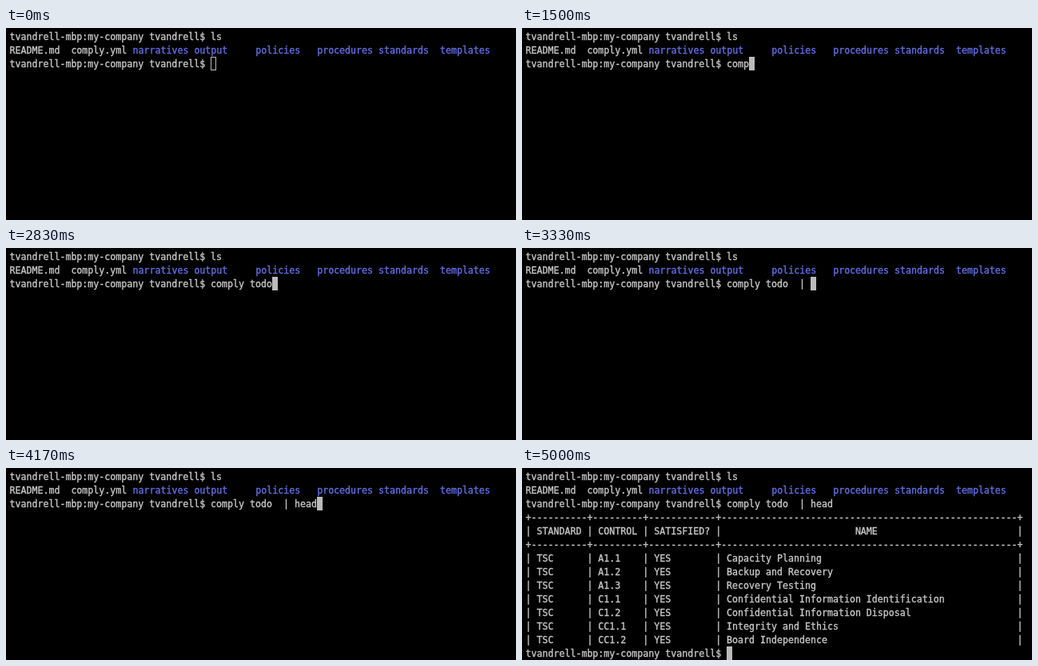
Animation, 638 px wide and 240 px high, one loop 6.99 s. Source, as an HTML page:

```html
<!DOCTYPE html>
<html lang="en">
<head>
<meta charset="utf-8">
<title>Terminal session</title>
<style>
  html, body { margin: 0; width: 100%; height: 100%; overflow: hidden; background: #000; }
  svg { display: block; width: 638px; height: 240px; }
  text {
    font: 11.627px "DejaVu Sans Mono", monospace;
    white-space: pre;
    fill: #c7c7c7;
    stroke: #c7c7c7;
    stroke-width: 0.35px;
  }
  .dirs { fill: #656ee6; stroke: #656ee6; }
  .block { fill: #bbb; }
  .typing, .hollow, .output { animation: 6990ms step-end infinite; }
  .typing { animation-name: type; }
  .hollow { animation-name: focus; }
  .output { animation-name: print; }

  /* each typed character moves the cursor one 7px cell */
  @keyframes type {
    0%      { transform: translateX(0); }
    19.027% { transform: translateX(14px); }
    21.459% { transform: translateX(28px); }
    26.18%  { transform: translateX(42px); }
    35.765% { transform: translateX(56px); }
    38.197% { transform: translateX(70px); }
    40.486% { transform: translateX(77px); }
    42.918% { transform: translateX(84px); }
    45.35%  { transform: translateX(91px); }
    47.639% { transform: translateX(105px); }
    54.792% { transform: translateX(112px); }
    57.224% { transform: translateX(133px); visibility: visible; }
    69.098%, 100% { transform: translateX(133px); visibility: hidden; }
  }
  @keyframes focus {
    0% { opacity: 1; }
    11.874%, 100% { opacity: 0; }
  }
  @keyframes print {
    0% { opacity: 0; }
    69.098%, 100% { opacity: 1; }
  }
</style>
</head>
<body>
<svg viewBox="0 0 638 240" shape-rendering="crispEdges">
  <text x="4.5" y="15">tvandrell-mbp:my-company tvandrell$ ls</text>
  <text x="4.5" y="32">README.md  comply.yml</text>
  <text x="158.5" y="32" class="dirs">narratives output     policies   procedures standards  templates</text>
  <text x="4.5" y="49">tvandrell-mbp:my-company tvandrell$ comply todo  | head</text>

  <!-- the black strip hides what is not typed yet -->
  <g class="typing">
    <rect x="256" y="36" width="150" height="17"/>
    <rect x="256" y="36" width="7" height="17" class="block"/>
    <rect x="257" y="37" width="5" height="15" class="hollow"/>
  </g>

  <g class="output">
    <g id="table"></g>
    <text x="4.5" y="236">tvandrell-mbp:my-company tvandrell$</text>
    <rect x="256" y="223" width="7" height="17" class="block"/>
  </g>
</svg>
<script>
  const widths = [10, 9, 12, 53];
  const rule = '+' + widths.map(w => '-'.repeat(w) + '+').join('');
  const row = cells => '|' + cells.map((c, i) => (' ' + c).padEnd(widths[i]) + '|').join('');

  const lines = [
    rule,
    row(['STANDARD', 'CONTROL', 'SATISFIED?', ' '.repeat(23) + 'NAME']),
    rule,
    ...[
      ['A1.1', 'Capacity Planning'],
      ['A1.2', 'Backup and Recovery'],
      ['A1.3', 'Recovery Testing'],
      ['C1.1', 'Confidential Information Identification'],
      ['C1.2', 'Confidential Information Disposal'],
      ['CC1.1', 'Integrity and Ethics'],
      ['CC1.2', 'Board Independence']
    ].map(([id, name]) => row(['TSC', id, 'YES', name]))
  ];

  const table = document.getElementById('table');
  lines.forEach((line, i) => {
    const text = document.createElementNS('http://www.w3.org/2000/svg', 'text');
    text.setAttribute('x', 4.5);
    text.setAttribute('y', 66 + 17 * i);
    text.textContent = line;
    table.append(text);
  });
</script>
</body>
</html>
```
